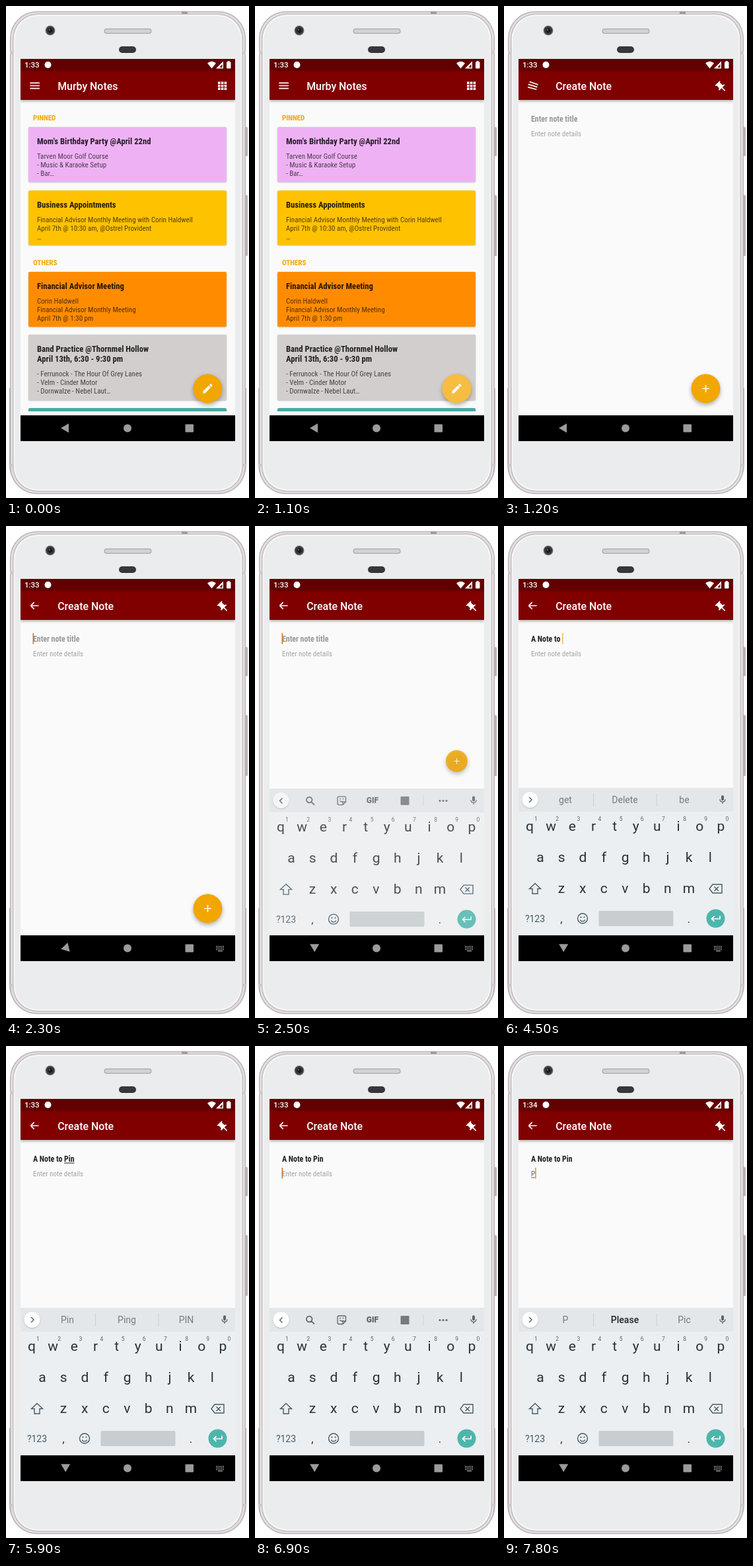
Write an HTML page with a canvas that moves like this. It is 368x744 px and loops after 8 s.

```html
<!DOCTYPE html>
<html lang="en">
<head>
<meta charset="utf-8">
<title>Note app</title>
<style>
html, body { margin: 0; width: 100%; height: 100%; overflow: hidden; background: #fff; }
canvas { display: block; width: 368px; height: 744px; }
</style>
</head>
<body>
<canvas id="stage"></canvas>
<script>
const W = 368, H = 744, LOOP = 8000, TICK = 100;
const PRESS = 1100, OPEN = 1140, NAV_TURN = 2250, IME_SHOW = 2410;
const canvas = document.getElementById('stage');
const ratio = window.devicePixelRatio || 1;
canvas.width = W * ratio;
canvas.height = H * ratio;
const c = canvas.getContext('2d');

const AMBER = '#f2a600', INK = '#263238', GREY = '#5f6368';
const mix = (a, b, p) => a + (b - a) * p;
const progress = (t, start, length) => Math.max(0, Math.min(1, (t - start) / length));
const smooth = p => (1 - Math.cos(Math.PI * p)) / 2;

const ICONS = {
  pin: 'M16 9V4h1a1 1 0 0 0 0-2H7a1 1 0 0 0 0 2h1v5a3 3 0 0 1-3 3v2h6v7l1 1 1-1v-7h6v-2a3 3 0 0 1-3-3z',
  pencil: 'M3 17.2V21h3.8L17.8 9.9l-3.7-3.7zM20.7 7a1 1 0 0 0 0-1.4l-2.3-2.3a1 1 0 0 0-1.4 0l-1.9 1.8 3.8 3.8z',
  plus: 'M19 13h-6v6h-2v-6H5v-2h6V5h2v6h6z',
  mic: 'M12 14a3 3 0 0 0 3-3V5a3 3 0 0 0-6 0v6a3 3 0 0 0 3 3zM17 11a5 5 0 0 1-10 0H5a7 7 0 0 0 6 6.9V21h2v-3.1A7 7 0 0 0 19 11z',
};
for (const name in ICONS) ICONS[name] = new Path2D(ICONS[name]);

const CARDS = [
  { y: 183, h: 83, color: '#eeb2f4', title: ["Mom's Birthday Party @April 22nd"],
    body: ['Tarven Moor Golf Course', '- Music & Karaoke Setup', '- Bar…'] },
  { y: 279, h: 82.5, color: '#ffc200', title: ['Business Appointments'],
    body: ['Financial Advisor Monthly Meeting with Corin Haldwell', 'April 7th @ 10:30 am, @Ostrel Provident', '…'] },
  { y: 402, h: 83, color: '#ff8c00', title: ['Financial Advisor Meeting'],
    body: ['Corin Haldwell', 'Financial Advisor Monthly Meeting', 'April 7th @ 1:30 pm'] },
  { y: 497, h: 99, color: '#d2cecd', title: ['Band Practice @Thornmel Hollow', 'April 13th, 6:30 - 9:30 pm'],
    body: ['- Ferrunock - The Hour Of Grey Lanes', '- Velm - Cinder Motor', '- Dornwalze - Nebel Laut…'] },
  { y: 608, h: 30, color: '#46aaa2', title: [], body: [] },
];

// [time, title, details, caret opacity, suggestions]
// "_" starts the underlined word, "*" marks the preferred suggestion
const EDITS = [
  [0, '', '', 0],
  [2200, '', '', 1],
  [2700, '', '', .5],
  [2800, '', '', 0],
  [3200, 'A', '', 1],
  [3300, 'A ', '', 1, 'few new lot'],
  [3600, 'A _N', '', 1, 'N New Nice'],
  [3800, 'A _No', '', 1, 'No Not November'],
  [3900, 'A _Not', '', 1, 'Not Note Nothing'],
  [4100, 'A _Note', '', 1, 'Note Notes Notebook'],
  [4200, 'A Note ', '', 1, 'to for from'],
  [4300, 'A Note _t', '', 1, 'to the that'],
  [4400, 'A Note _to', '', 1, 'to too today'],
  [4500, 'A Note to ', '', .65, 'get Delete be'],
  [4900, 'A Note to _P', '', 1, 'get Delete be'],
  [5000, 'A Note to _P', '', 1, 'P Pay Pic'],
  [5200, 'A Note to _Pi', '', 1, 'P Pay Pic'],
  [5300, 'A Note to _Pin', '', 1, 'Pi Pick Pieces'],
  [5400, 'A Note to _Pin', '', 1, 'Pin Ping PIN'],
  [5900, 'A Note to _Pin', '', 0, 'Pin Ping PIN'],
  [6400, 'A Note to _Pin', '', 1, 'Pin Ping PIN'],
  [6700, 'A Note to Pin', '', 1, 'Pin Ping PIN'],
  [6800, 'A Note to Pin', '', 1],
  [7100, 'A Note to Pin', '', .5],
  [7200, 'A Note to Pin', '', 0],
  [7700, 'A Note to Pin', '_P', 1],
  [7800, 'A Note to Pin', '_P', 1, 'P *Please Pic'],
];

function box(x, y, w, h, color, r = 0) {
  c.fillStyle = color;
  c.beginPath();
  c.roundRect(x, y, w, h, r);
  c.fill();
}

function disc(x, y, r, color) {
  c.fillStyle = color;
  c.beginPath();
  c.arc(x, y, r, 0, Math.PI * 2);
  c.fill();
}

function shape(points, color) {
  c.fillStyle = color;
  c.beginPath();
  for (const [x, y] of points) c.lineTo(x, y);
  c.fill();
}

function stroke(path, color, width = 1.5) {
  c.strokeStyle = color;
  c.lineWidth = width;
  c.stroke(new Path2D(path));
}

function clipped(x, y, w, h, paint) {
  c.save();
  c.beginPath();
  c.rect(x, y, w, h);
  c.clip();
  paint();
  c.restore();
}

function icon(name, x, y, size, color, turn = 0) {
  c.save();
  c.translate(x, y);
  c.rotate(turn);
  c.scale(size / 24, size / 24);
  c.translate(-12, -12);
  c.fillStyle = color;
  c.fill(ICONS[name]);
  c.restore();
}

function shadow(blur, dy, alpha, paint) {
  c.save();
  c.shadowColor = `rgba(0,0,0,${alpha})`;
  c.shadowBlur = blur * ratio;
  c.shadowOffsetY = dy * ratio;
  paint();
  c.restore();
}

function text(s, x, y, size, color, weight = 400, align = 'left') {
  c.font = `${weight} ${size}px Roboto, sans-serif`;
  c.textAlign = align;
  c.fillStyle = color;
  c.fillText(s, x, y);
}

// Narrow face where there is one, otherwise slightly tighter tracking.
function setNarrow(size, weight) {
  const sample = 'Monthly Meeting';
  c.textAlign = 'left';
  c.font = `${weight} ${size}px Roboto, sans-serif`;
  const plain = c.measureText(sample).width;
  c.font = `${weight} condensed ${size}px "Roboto Condensed", Roboto, sans-serif`;
  if ('fontStretch' in c) c.fontStretch = 'condensed';
  if (c.measureText(sample).width > plain * .96) c.letterSpacing = `${-.058 * size}px`;
}

function narrow(s, x, y, size, color, weight = 400) {
  c.save();
  setNarrow(size, weight);
  c.fillStyle = color;
  c.fillText(s, x, y);
  c.restore();
}

function narrowWidth(s, size, weight) {
  c.save();
  setNarrow(size, weight);
  const width = c.measureText(s).width;
  c.restore();
  return width;
}

function phone() {
  box(362, 183, 4, 44, '#b9b2b5', 1.5);
  box(362, 286, 4, 92, '#b9b2b5', 1.5);
  box(5, 578, 359, 160, '#bbb3b6', [0, 0, 44, 44]);
  box(6, 8, 357, 730, '#b5adb0', 41);
  box(7.2, 9.2, 354.6, 727.6, '#e4dfe1', 40);
  box(10, 11.5, 349, 723, '#c5bec1', 38);
  box(11.5, 13, 346, 720, '#f6f6f7', 37);
  box(13.5, 15, 342, 716, '#ebecee', 36);
  for (const y of [68, 692]) {
    box(6, y, 5.5, 5, '#cfc9cc');
    box(357.5, y, 5.5, 5, '#cfc9cc');
  }
  box(266, 8, 9, 4, '#a39c9f');
  disc(67, 37, 7.5, '#77777c');
  disc(67, 37, 6.2, '#36363b');
  disc(67, 37, 3.2, '#18181d');
  disc(66, 36, 1.2, '#66668a');
  box(148.5, 34, 72, 8, '#a9a9ad', 4);
  box(149.7, 35.2, 69.6, 5.6, '#d3d3d6', 3);
  box(171, 61, 26, 10, '#37373b', 5);
}

function statusBar(t) {
  box(22, 80, 325, 18.5, '#620000');
  text(t < 7100 ? '1:33' : '1:34', 28, 93, 11.5, '#fff', 500);
  disc(63.5, 89, 5, '#fff');
  c.fillStyle = '#fff';
  c.beginPath();
  c.moveTo(311.5, 94.5);
  c.lineTo(305, 86.5);
  c.quadraticCurveTo(311.5, 81, 318, 86.5);
  c.fill();
  shape([[318, 94.5], [329, 94.5], [329, 83.5]], '#fff');
  shape([[323.5, 93], [327.5, 93], [327.5, 88]], '#620000');
  box(334, 84.5, 6.5, 10, '#fff', 1);
  box(335.7, 83, 3, 2, '#fff');
}

function menuArrow(p) {
  c.save();
  c.translate(43.6, 120.5);
  c.rotate(Math.PI * p);
  c.strokeStyle = '#fff';
  c.lineWidth = 1.7;
  c.beginPath();
  const end = mix(7.3, 6, p);
  c.moveTo(-end, 0);
  c.lineTo(end, 0);
  for (const side of [-1, 1]) {
    c.moveTo(mix(-7.3, 1, p), side * mix(4.2, 5.1, p));
    c.lineTo(mix(7.3, 6.2, p), side * mix(4.2, 0, p));
  }
  c.stroke();
  c.restore();
}

function appBar(t, editing) {
  shadow(4, 1.5, .3, () => box(22, 98, 325, 44, '#800000'));
  statusBar(t);
  menuArrow(smooth(progress(t, OPEN, 300)));
  text(editing ? 'Create Note' : 'Murby Notes', 78.2, 127, 15.9, '#fff', 500);
  if (editing) icon('pin', 329, 122.5, 20, '#fff', -Math.PI / 4);
  else for (let i = 0; i < 9; i++) box(321 + i % 3 * 4.8, 114.5 + (i / 3 | 0) * 4.5, 3.6, 3.5, '#fff');
}

function noteList() {
  narrow('PINNED', 41, 173, 11, AMBER, 700);
  narrow('OTHERS', 41, 392, 11, AMBER, 700);
  for (const { y, h, color, title, body } of CARDS) {
    shadow(2, .7, .28, () => box(34, y, 300, h, color, 2));
    title.forEach((s, i) => narrow(s, 47, y + 26 + i * 15, 12.65, 'rgba(0,0,0,.85)', 700));
    const top = y + 33 + title.length * 15;
    body.forEach((s, i) => narrow(s, 47, top + i * 12.8, 11, 'rgba(0,0,0,.68)'));
  }
}

function fab(x, y, scale, name, alpha = 1, pressed = false) {
  c.save();
  c.globalAlpha = alpha;
  shadow(6, 3, .3, () => disc(x, y, 22 * scale, AMBER));
  if (pressed) disc(x, y, 22 * scale, 'rgba(255,255,255,.25)');
  icon(name, x, y, 19 * scale, '#fff');
  c.restore();
}

function field(value, hint, y, size, weight, color, hintColor, caret) {
  const [before, word] = value.split('_');
  const typed = value.replace('_', '');
  narrow(typed || hint, 41, y, size, typed ? color : hintColor, weight);
  const end = 41 + narrowWidth(typed, size, weight);
  if (word) {
    const start = 41 + narrowWidth(before, size, weight);
    box(start, y + 1.5, end - start, 1, color);
  }
  c.save();
  c.globalAlpha = caret;
  box(end - (typed ? 0 : .5), y - 13, 1.6, 16.5, typed ? '#f09a10' : '#d07a30');
  c.restore();
}

function toolbar() {
  stroke('M41.5 410.5l-4 4 4 4', GREY);
  stroke('M86.5 413a4.3 4.3 0 1 1-8.6 0a4.3 4.3 0 1 1 8.6 0M85.5 416.2l4.5 4.5', GREY, 1.7);
  stroke('M127 408h8.5a2 2 0 0 1 2 2v6l-4.5 4.5h-6a2 2 0 0 1-2-2v-8.5a2 2 0 0 1 2-2M133 420.5v-4.5h4.5M128.5 414a2.6 2.6 0 0 0 4.5 1', GREY, 1.3);
  disc(129, 411.5, .9, GREY);
  disc(133.5, 411.5, .9, GREY);
  text('GIF', 178, 418.3, 12, GREY, 800, 'center');
  box(220.5, 408, 13, 13, '#777b80', 1);
  box(254.7, 406, 1, 17, '#cdd2d5');
  for (const x of [280, 285, 290]) disc(x, 414.5, 1.5, GREY);
}

function suggestions(words) {
  stroke('M38 410l4 4-4 4', GREY);
  words.split(' ').forEach((word, i) => {
    const strong = word[0] === '*';
    text(word.replace('*', ''), 93 + i * 90, 419, 14, strong ? '#202428' : '#747b80', strong ? 500 : 400, 'center');
  });
  for (const x of [135, 230.5]) box(x, 404, 1, 20, '#ccd1d4');
}

// The keyboard fades in while rising by a tenth of its height.
function keyboard(p, words) {
  c.translate(0, 22 * (1 - p) ** 5);
  c.globalAlpha = 1 - (1 - p) ** 3;
  box(22, 396, 325, 226, '#eceff1');
  box(22, 396, 325, 36, '#e4e7e9');
  shadow(2, 1, .2, () => disc(39.5, 414, 12, '#fff'));
  if (words) suggestions(words);
  else toolbar();
  icon('mic', 331, 414, 16, GREY);

  const step = 32.15;
  const rows = [['qwertyuiop', 39, 461], ['asdfghjkl', 55, 508], ['zxcvbnm', 87, 555]];
  for (const [keys, x, y] of rows)
    [...keys].forEach((key, i) => text(key, x + i * step, y, 21, INK, 400, 'center'));
  for (let i = 0; i < 10; i++) text((i + 1) % 10, 48.5 + i * step, 446, 8.5, GREY, 400, 'center');

  stroke('M47 540.5l8.5 8h-4.5v7.5h-8v-7.5h-4.5z', '#455a64', 1.4);
  stroke('M316 542h14v13h-14l-5-6.5zM318.5 545.5l6.5 6.5M325 545.5l-6.5 6.5', '#455a64', 1.4);
  text('?123', 47, 598.5, 14, '#455a64', 400, 'center');
  text(',', 87, 600, 17, INK, 400, 'center');
  text('.', 280, 600, 17, INK, 400, 'center');
  stroke('M126.5 593.5a7.5 7.5 0 1 1-15 0a7.5 7.5 0 1 1 15 0M115.2 595.5a4.2 4.2 0 0 0 7.6 0', '#455a64', 1.4);
  disc(116.5, 591.5, 1.1, '#455a64');
  disc(121.5, 591.5, 1.1, '#455a64');
  box(143.5, 582, 113, 23, '#c7cdd0', 2);
  disc(320.5, 593.5, 14, '#4db6ac');
  stroke('M327 589.5v4.5h-12.5M318.5 590l-4 4 4 4', '#fff', 1.7);
}

function navBar(t) {
  const grey = '#9b9b9b';
  const turn = smooth(progress(t, NAV_TURN, 200));
  box(22, 619, 325, 39, '#000');
  c.save();
  c.translate(mix(89, 90.2, turn), 638.3);
  c.rotate(-Math.PI / 2 * turn);
  shape([[-6, 0], [6, -7], [6, 7]], grey);
  c.restore();
  disc(184, 638.5, 6, grey);
  box(271.5, 632.5, 12.5, 12, grey, 1);
  if (t < NAV_TURN) return;
  for (let i = 0; i < 15; i++) box(318 + i % 5 * 2.6, 635 + (i / 5 | 0) * 2.4, 1.6, 1.4, grey);
  box(321, 642, 7, 1.3, grey);
}

function screen(t) {
  const editing = t >= OPEN;
  const [, title, details, caret, words] = EDITS.findLast(edit => edit[0] <= t);
  box(22, 80, 325, 578, '#fafafa');
  if (editing) {
    const inDetails = t >= 6700;
    field(title, 'Enter note title', 175, 11.85, 700, '#202020', '#969696', inDetails ? 0 : caret);
    field(details, 'Enter note details', 197, 11, 400, '#606060', '#a3a3a3', inDetails ? caret : 0);
  } else {
    clipped(22, 142, 325, 471, noteList);
  }
  appBar(t, editing);
  if (t < IME_SHOW) {
    fab(305.5, 578.5, 1, editing ? 'plus' : 'pencil', 1, t >= PRESS && !editing);
  } else {
    const hide = progress(t, IME_SHOW, 150);
    if (hide < 1) fab(305.5, 355.5, 1 - .7 * hide ** 2, 'plus', 1 - .5 * hide ** 2);
    clipped(22, 150, 325, 470, () => keyboard(progress(t, IME_SHOW, 200), words));
  }
  navBar(t);
}

function draw(t) {
  c.setTransform(ratio, 0, 0, ratio, 0, 0);
  box(0, 0, W, H, '#fff');
  phone();
  clipped(22, 80, 325, 578, () => screen(t));
}

function frame(now) {
  const t = (now - start) % LOOP;
  draw(Math.floor(t / TICK) * TICK);
  requestAnimationFrame(frame);
}

const start = performance.now();
draw(0);
requestAnimationFrame(() => frame(performance.now()));
</script>
</body>
</html>
```
